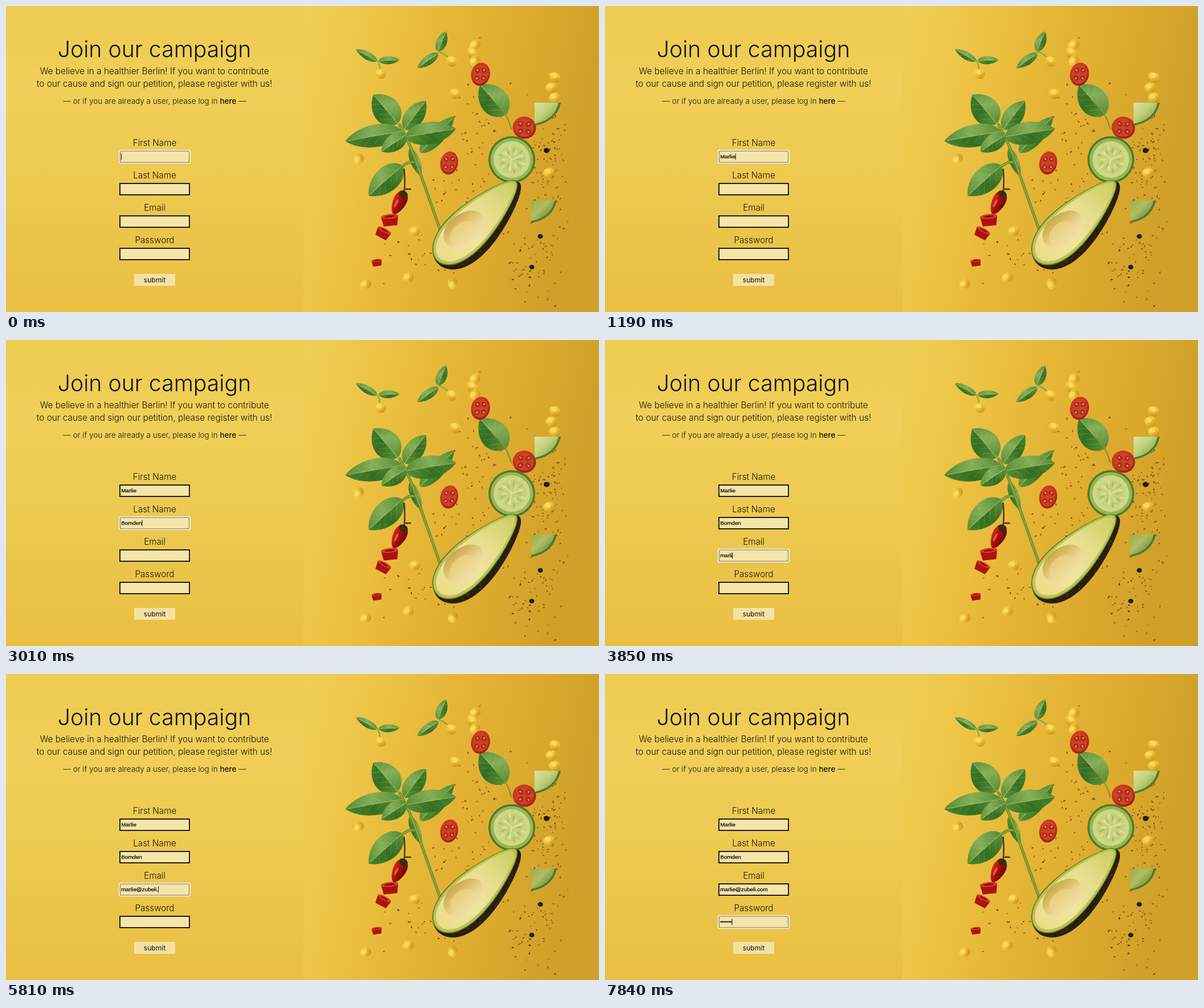
Recreate the animation shown at these times as an HTML page with a canvas. Size 1041 px wide and 538 px high, loop 8 s.

```html
<!DOCTYPE html>
<html lang="en">
<head>
<meta charset="utf-8">
<title>Join our campaign</title>
<style>
  html, body { margin: 0; width: 100%; height: 100%; overflow: hidden; background: #eac243; }
  canvas, svg { position: absolute; left: 0; top: 0; width: 1041px; height: 538px; }
  text { font-family: Inter, Lato, sans-serif; font-optical-sizing: none; fill: #16130a; }
  .mid { text-anchor: middle; }
  .title { font-size: 39.2px; font-weight: 300; }
  .lead { font-size: 15.4px; font-weight: 300; }
  .note { font-size: 13.5px; font-weight: 300; }
  .note tspan { font-weight: 500; }
  .label { font-size: 15.2px; font-weight: 300; }
  .button { font-size: 12.1px; }
  .typed { font: 9.8px "Liberation Sans", Arial, sans-serif; fill: #000; stroke: #000; stroke-width: .2px; }
</style>
</head>
<body>
<canvas id="photo" width="1041" height="538"></canvas>
<svg id="form" viewBox="0 0 1041 538">
  <text class="mid title" x="260.5" y="90">Join our campaign</text>
  <text class="mid lead" x="260.5" y="119.5">We believe in a healthier Berlin! If you want to contribute</text>
  <text class="mid lead" x="260.5" y="141.5">to our cause and sign our petition, please register with us!</text>
  <text class="mid note" x="261" y="171.5">— or if you are already a user, please log in <tspan>here</tspan> —</text>
  <rect x="225" y="471" width="72" height="21" fill="#f5e2a3"/>
  <text class="mid button" x="261" y="485.5">submit</text>
</svg>
<script>
const ctx = document.getElementById('photo').getContext('2d');

// ---------- drawing helpers ----------

let seed = 11;
const rand = () => (seed = seed * 16807 % 2147483647) / 2147483647;
const spread = r => (rand() + rand() + rand() - 1.5) * r;
const rad = deg => deg * Math.PI / 180;

// draws around (x, y), turned by a number of degrees
function at(x, y, deg, draw) {
  ctx.save();
  ctx.translate(x, y);
  ctx.rotate(rad(deg));
  draw();
  ctx.restore();
}

function shade(x1, y1, x2, y2, ...colors) {
  const g = ctx.createLinearGradient(x1, y1, x2, y2);
  colors.forEach((c, i) => g.addColorStop(i / (colors.length - 1), c));
  return g;
}

function paint(path, fill) {
  ctx.fillStyle = fill;
  ctx.fill(path);
}

function line(d, color, width) {
  ctx.strokeStyle = color;
  ctx.lineWidth = width;
  ctx.lineCap = 'round';
  ctx.stroke(new Path2D(d));
}

// egg lying on the x axis; a taper above 0 narrows its right end
function egg(long, wide, taper, fill) {
  const path = new Path2D();
  for (let a = 0; a < 360; a += 5) {
    const c = Math.cos(rad(a));
    path.lineTo(long * c, wide * Math.sin(rad(a)) * (1 - taper * c));
  }
  path.closePath();
  paint(path, fill);
  return path;
}

const oval = (x, y, rx, ry, deg, fill) => at(x, y, deg, () => egg(rx, ry, 0, fill));

// leaf growing from its base in a direction, one half lit
function leaf(x, y, deg, len, width) {
  at(x, y, deg, () => {
    const w = width * .66;
    const half = s => new Path2D(`M0 0C${len * .12} ${s * w} ${len * .72} ${s * w} ${len} 0Z`);
    const lit = Math.abs(deg) > 90 ? 1 : -1;
    paint(half(-lit), shade(0, 0, len, -lit * w, '#5d9138', '#336e22', '#4b8530'));
    paint(half(lit), shade(0, 0, len, lit * w, '#568d35', '#86ae58', '#4b872f'));
    line(`M0 0H${len * .95}`, '#a3bd68', 1);
    for (let a = .15; a < .7; a += .17)
      for (const s of [-1, 1])
        line(`M${a * len} 0Q${(a + .1) * len} ${s * w * .2} ${(a + .18) * len} ${s * w * .5}`, 'rgba(185,210,125,.3)', .8);
  });
}

function corn(x, y) {
  at(x, y, spread(60), () => {
    egg(10, 8.5, -.15, shade(-8, -8, 8, 8, '#f6d354', '#efc035', '#c88c19'));
    oval(-2, -2, 5, 4, 0, 'rgba(253,225,110,.75)');
  });
}

function tomato(x, y, rx, ry) {
  at(x, y, 12, () => {
    egg(rx, ry, 0, shade(-rx, -ry, rx, ry, '#dc3f27', '#c02c1a', '#9a1910'));
    egg(rx * .8, ry * .8, 0, '#cb4228');
    for (let a = 35; a < 360; a += 90) {
      const c = Math.cos(rad(a)) * rx, s = Math.sin(rad(a)) * ry;
      oval(c * .47, s * .47, rx * .26, ry * .22, a, '#ab2a18');
      oval(c * .5, s * .5, 2.2, 1.3, a, '#e3a465');
    }
  });
}

// quarter of a cucumber slice with its corner at (x, y)
function wedge(x, y, r, ...flesh) {
  const pie = (size, fill) => {
    const path = new Path2D(`M${x} ${y}h${size}q${-size * .15} ${size * .72} ${-size} ${size * .88}z`);
    paint(path, fill);
  };
  pie(r, '#4c7a30');
  pie(r - 4, shade(x, y, x + r * .7, y + r * .7, ...flesh));
}

function chilliSlice(x, y, r, deg) {
  at(x, y, deg, () => {
    paint(new Path2D(`M${-r} ${-r * .4}H${r}L${r * .8} ${r * .7}H${-r * .8}Z`), '#ad120f');
    oval(0, -r * .4, r, r * .28, 0, '#d93925');
    oval(0, -r * .4, r * .6, r * .12, 0, '#8a120b');
  });
}

// ---------- picture ----------

function backdrop() {
  ctx.fillStyle = shade(522, 0, 1041, 110, '#f0ce56', '#edc446', '#e6b636', '#dcab2e', '#cfa029');
  ctx.fillRect(522, 0, 519, 538);
  ctx.fillStyle = shade(0, 0, 0, 538, '#eecb51', '#f0cf58', '#eecb52', '#ebc54a', '#e9bf42');
  ctx.fillRect(0, 0, 522, 538);
}

function specks(x, y, w, h, count) {
  const tones = ['#7b430f', '#94510f', '#5a3210', '#a8421a'];
  for (let i = 0; i < count; i++)
    oval(x + spread(w), y + spread(h), 1 + rand() * 1.5, .5 + rand() * .7, rand() * 180, tones[i % 4]);
}

function spices() {
  specks(825, 215, 50, 110, 40);
  specks(790, 325, 60, 40, 18);
  specks(955, 270, 40, 90, 85);
  specks(932, 440, 55, 80, 60);
  specks(740, 435, 70, 50, 28);
  oval(949, 254, 5, 4.5, 0, '#241a0d');
  oval(938, 405, 4.5, 4, 0, '#241a0d');
  oval(923, 459, 4.5, 4, 0, '#241a0d');
}

function sprouts() {
  line('M652 96Q656 103 657 114M759 80Q768 82 778 92', '#92a93f', 2.5);
  leaf(652, 97, -151, 43, 14);
  leaf(654, 96, -2, 37, 14);
  leaf(758, 80, -68, 38, 19);
  leaf(759, 83, 145, 45, 17);
}

function basil() {
  leaf(727, 258, -47, 88, 30);
  leaf(709, 250, 68, 53, 17);
  const stem = 'M691 209Q708 239 718 268T762 393M696 282Q709 272 716 275M700 236Q714 230 734 222';
  line(stem, '#67872e', 5);
  line(stem, '#90a946', 2.2);
  leaf(688, 207, -130, 67, 48);
  leaf(695, 220, 170, 101, 40);
  leaf(699, 217, -53, 63, 34);
  leaf(701, 230, -9, 90, 40);
  leaf(703, 226, 146, 53, 30);
  leaf(696, 280, 138, 80, 44);
}

function chilli() {
  line('M699 287Q701 309 699 327M702 322H710', '#403313', 2.4);
  at(690, 346, 116, () => {
    egg(22, 11.5, .25, shade(0, 12, 0, -12, '#d22a1a', '#a60e0c', '#670805'));
    oval(3, 4, 8, 2, 0, 'rgba(255,135,100,.6)');
    oval(-17, 0, 6, 8, 0, '#3b2c10');
  });
  chilliSlice(674, 376, 15, -6);
  chilliSlice(662, 399, 13, 28);
  chilliSlice(651, 451, 9, -8);
}

function cucumber() {
  at(888, 270, 0, () => {
    ['#4a7a30', '#9ab650', '#cdd885', '#c5d07b'].forEach((c, i) => egg(41 - i * 2.5 - i * i, 41 - i * 2.5 - i * i, 0, c));
    for (let a = 0; a < 360; a += 20) {
      const d = 13 + a % 3 * 4;
      oval(Math.cos(rad(a)) * d, Math.sin(rad(a)) * d, 5, 1.5, a, a % 40 ? '#dbe199' : '#abbd62');
    }
    line('M0 0L-12 -14M0 0L16 -7M0 0L-5 18', '#dde4a0', 2);
  });
  wedge(928, 170, 46, '#dce2a3', '#c4d27e', '#88a94a');
  wedge(922, 342, 45, '#9aae48', '#b0bd62', '#688d38');
}

function avocado() {
  at(830, 382, -45, () => {
    const skin = egg(101, 42, .35, '#2a1f10');
    ctx.save();
    ctx.clip(skin);
    for (let i = 0; i < 150; i++)
      oval(spread(120), 36 + spread(25), 1.5, .8, 0, i % 3 ? '#51401f' : '#120d07');
    ctx.restore();
  });
  at(826, 378, -45, () => {
    egg(99, 36.5, .35, '#66852e');
    egg(97, 35, .35, '#b9c454');
    egg(92, 31, .35, shade(-90, 0, 90, 0, '#ecdc88', '#f0e5a0', '#e6dd8b', '#cdce62'));
  });
  at(803, 392, -43, () => {
    egg(40, 26, .1, shade(0, -26, 0, 26, '#c9a74d', '#dcbf69', '#ecd795', '#f1e0a5'));
    oval(-6, 2, 24, 15, 0, 'rgba(241,218,142,.6)');
  });
}

function photo() {
  backdrop();
  spices();
  sprouts();
  basil();
  chilli();
  for (let i = 0; i < 3; i++) {
    const sway = i % 2 * -6;
    corn(823 + sway, 68 + i * 14);
    corn(963 + sway, 125 + i * 18);
  }
  [[782, 97], [657, 119], [788, 154], [619, 269], [953, 293], [717, 396], [706, 477], [631, 489], [784, 488]]
    .forEach(p => corn(...p));
  leaf(878, 191, -131, 70, 50);
  line('M860 171Q880 188 887 216', '#799434', 2.2);
  tomato(833, 120, 16.5, 20.5);
  tomato(910, 214, 20.5, 19.5);
  tomato(778, 276, 15.5, 20.5);
  cucumber();
  avocado();
}

// ---------- form ----------

const form = document.getElementById('form');
const LEFT = 202.2, LOOP = 8000, BLINK = 500;

function add(tag, attrs, text = '') {
  const el = document.createElementNS(form.namespaceURI, tag);
  for (const k in attrs) el.setAttribute(k, attrs[k]);
  el.textContent = text;
  form.append(el);
  return el;
}

// bursts of typing: start, characters, pause between them
const fields = [
  { name: 'First Name', value: 'Marlie', focus: 0, bursts: [[280, 6, 168]] },
  { name: 'Last Name', value: 'Bomden', focus: 1540, bursts: [[1960, 4, 163], [2800, 2, 0]] },
  { name: 'Email', value: 'marlie@zubeli.com', focus: 3290, bursts: [[3430, 6, 105], [4760, 1, 0], [5110, 10, 116]] },
  { name: 'Password', value: '••••••', focus: 6510, bursts: [[6580, 1, 0], [7280, 5, 140]] }
];

fields.forEach((f, i) => {
  f.y = 254 + i * 57;
  f.keys = f.bursts.flatMap(([start, count, pause]) => Array.from({ length: count }, (_, k) => start + k * pause));
  add('text', { class: 'mid label', x: 261, y: f.y - 8 }, f.name);
  f.plain = add('rect', { x: 200, y: f.y + 1, width: 122, height: 20, fill: '#f6e4a9', stroke: '#0c0a04', 'stroke-width': 1.8 });
  f.halo = add('rect', { x: 199, y: f.y, width: 124, height: 22, rx: 3, fill: '#f6e4a9', stroke: '#fffdf3', 'stroke-width': 1.8 });
  f.ring = add('rect', { x: 200.3, y: f.y + 1, width: 121.4, height: 20, rx: 2, fill: 'none', stroke: '#6d695c', 'stroke-width': 1.1 });
  f.typed = add('text', { class: 'typed', x: LEFT, y: f.y + 14.2 });
});
const caret = add('rect', { width: 1, height: 11, fill: '#111' });

const toggle = (el, on) => el.style.display = on ? '' : 'none';

function show(t) {
  const active = fields.findLast(f => f.focus <= t);
  for (const f of fields) {
    toggle(f.plain, f !== active);
    toggle(f.halo, f === active);
    toggle(f.ring, f === active);
    f.typed.textContent = f.value.slice(0, f.keys.filter(k => k <= t).length);
  }
  const last = active.keys.findLast(k => k <= t) ?? active.focus;
  const width = active.typed.textContent ? active.typed.getComputedTextLength() : 0;
  caret.setAttribute('x', LEFT - .2 + width);
  caret.setAttribute('y', active.y + 5.5);
  toggle(caret, Math.floor((t - last) / BLINK) % 2 === 0);
}

photo();
const start = performance.now();
function tick() {
  show((performance.now() - start) % LOOP);
  requestAnimationFrame(tick);
}
tick();
</script>
</body>
</html>
```
